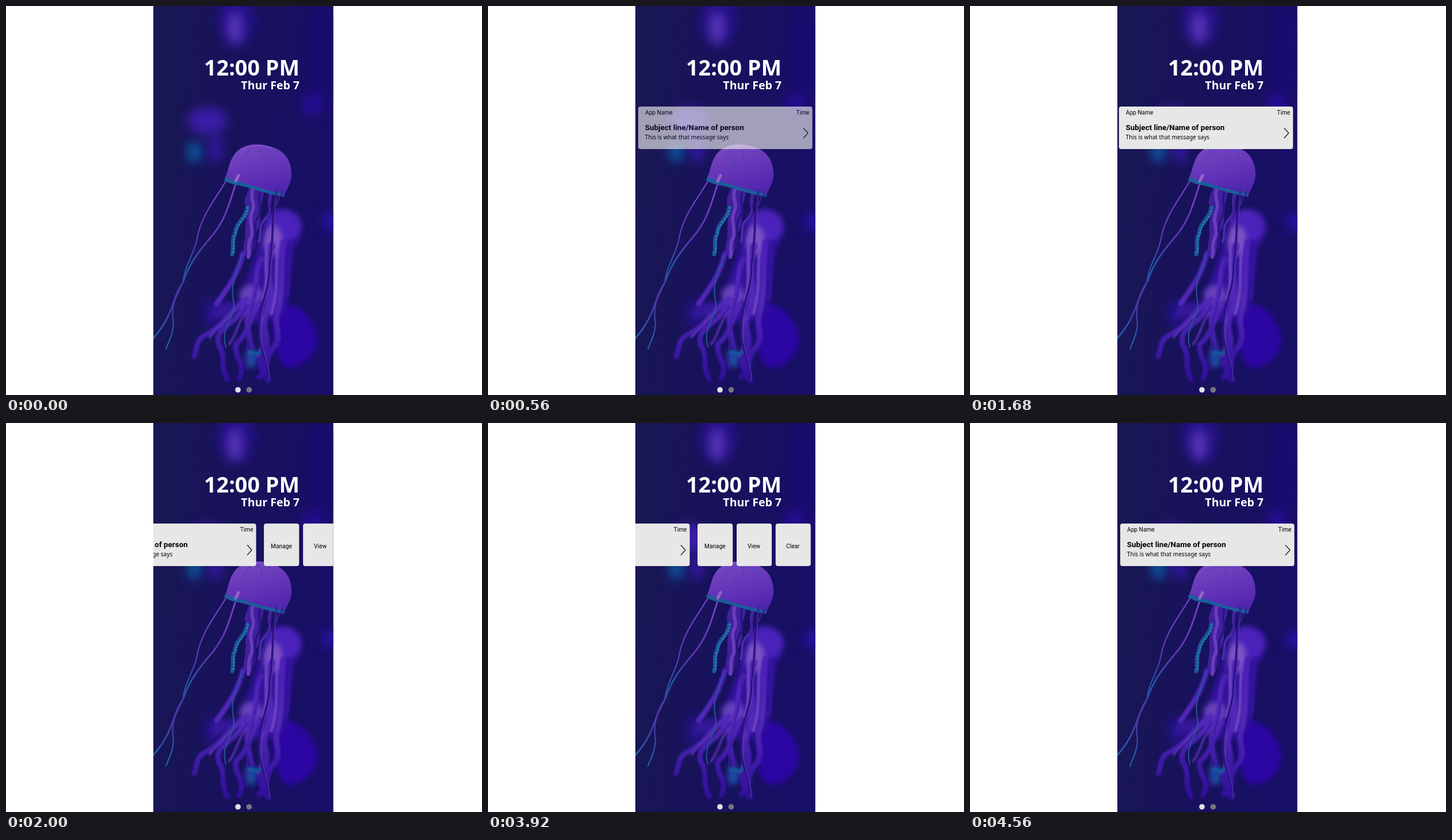
Animation, 827 px wide and 677 px high, one loop 6840 ms. Source, as an HTML page:

```html
<!DOCTYPE html>
<html lang="en">
<head>
<meta charset="utf-8">
<title>Lock screen notification</title>
<style>
  html, body { margin: 0; width: 100%; height: 100%; overflow: hidden; background: #fff; }
  svg { display: block; }
  filter { color-interpolation-filters: sRGB; }
  .line { fill: none; stroke-linecap: round; stroke-linejoin: round; }
  .clock { font-family: "Noto Sans", sans-serif; font-weight: 700; fill: #fff; text-anchor: end; }
  .label { font: 10.2px Roboto, sans-serif; }
  .subject { font: 700 13.4px Roboto, sans-serif; }
  .message { font: 10.1px "Noto Sans", sans-serif; }
  .end { text-anchor: end; }
  .mid { text-anchor: middle; }
</style>
</head>
<body>
<svg width="827" height="677" viewBox="0 0 827 677">
  <defs>
    <clipPath id="screen"><rect x="256" width="312.7" height="677"/></clipPath>
    <filter id="haze" x="-50%" y="-50%" width="200%" height="200%"><feGaussianBlur stdDeviation="9"/></filter>
    <filter id="soft" x="-30%" y="-30%" width="160%" height="160%"><feGaussianBlur stdDeviation="4"/></filter>
    <filter id="near" x="-30%" y="-30%" width="160%" height="160%"><feGaussianBlur stdDeviation="1.6"/></filter>
    <linearGradient id="sea" x1="0" y1="0" x2="1" y2="0.15">
      <stop offset="0" stop-color="#191853"/>
      <stop offset=".5" stop-color="#18125c"/>
      <stop offset="1" stop-color="#180f66"/>
    </linearGradient>
    <linearGradient id="bell" x1="0" y1="0" x2=".35" y2="1">
      <stop offset="0" stop-color="#7a4cc2"/>
      <stop offset=".5" stop-color="#6838ba"/>
      <stop offset="1" stop-color="#5226ae"/>
    </linearGradient>
    <linearGradient id="strand" gradientUnits="userSpaceOnUse" x1="0" y1="305" x2="0" y2="597">
      <stop offset="0" stop-color="#7844c8"/>
      <stop offset=".35" stop-color="#6034b8"/>
      <stop offset=".5" stop-color="#1f58a6"/>
      <stop offset=".7" stop-color="#5030ac"/>
      <stop offset="1" stop-color="#1a68a8"/>
    </linearGradient>
    <linearGradient id="arms" gradientUnits="userSpaceOnUse" x1="0" y1="380" x2="0" y2="650">
      <stop offset="0" stop-color="#4a1cb8"/>
      <stop offset=".5" stop-color="#5228b8"/>
      <stop offset="1" stop-color="#30109a"/>
    </linearGradient>
  </defs>

  <g clip-path="url(#screen)">
    <rect x="255" width="314" height="677" fill="url(#sea)"/>

    <!-- out-of-focus jellyfish -->
    <g filter="url(#haze)">
      <ellipse cx="400" cy="25" rx="32" ry="46" fill="#26108a"/>
      <ellipse cx="398" cy="38" rx="13" ry="28" fill="#5636b4"/>
      <ellipse cx="545" cy="90" rx="22" ry="100" fill="#190c70"/>
      <ellipse cx="532" cy="172" rx="18" ry="20" fill="#260c90"/>
      <ellipse cx="562" cy="376" rx="10" ry="16" fill="#2c12b4"/>
      <ellipse cx="350" cy="200" rx="34" ry="24" fill="#3a1ca6"/>
      <ellipse cx="364" cy="250" rx="12" ry="24" fill="#32189e"/>
      <ellipse cx="327" cy="254" rx="12" ry="18" fill="#0d56a0"/>
      <ellipse cx="360" cy="535" rx="16" ry="26" fill="#24128a"/>
    </g>
    <g filter="url(#soft)">
      <path d="M470 519C505 512 533 538 541 577C541 604 519 629 490 630C466 624 456 550 470 519Z" fill="#2c06a2"/>
      <path d="M450 374C462 349 492 345 510 367C520 383 512 406 500 421L486 525C470 560 414 560 402 520L431 440Z" fill="#32129c"/>
      <path d="M452 370C468 348 498 349 511 374C517 392 503 408 492 410L452 396Z" fill="#4a22ba"/>
      <ellipse cx="464" cy="408" rx="17" ry="27" fill="#7a50c2"/>
      <ellipse cx="426" cy="503" rx="20" ry="18" fill="#6640ba"/>
      <ellipse cx="426" cy="612" rx="11" ry="18" fill="#1c489c"/>
      <path d="M362 518L402 514L390 542L354 542Z" fill="#34189a"/>
    </g>

    <!-- trailing arms -->
    <g class="line" stroke="url(#arms)" filter="url(#near)">
      <path d="M412 430C400 474 385 490 366 518" stroke-width="9"/>
      <path d="M419 510C386 532 383 552 350 571C329 579 333 594 327 610" stroke-width="9"/>
      <path d="M414 520C399 558 359 559 370 591C383 609 371 625 384 650" stroke-width="9"/>
      <path d="M437 520C420 553 421 570 399 589C397 617 418 620 405 648" stroke-width="9"/>
      <path d="M462 417C446 468 468 490 454 530C437 562 462 574 447 603C435 626 450 635 455 650" stroke-width="12"/>
      <path d="M482 411C476 457 482 489 473 529C462 557 482 572 466 593C445 615 462 630 440 646" stroke-width="10"/>
      <path d="M495 410C488 455 494 482 487 512" stroke-width="6" stroke="#36139f"/>
      <path d="M443 440C429 473 440 492 425 522C413 547 422 568 427 594" stroke-width="9"/>
      <path d="M453 420C449 458 457 478 446 511M472 425C467 465 474 496 461 536" stroke-width="5" stroke="#7046c2"/>
      <path d="M399 530C381 549 371 554 354 577M419 530C400 553 402 572 387 589M448 539C435 565 451 581 437 610" stroke-width="3" stroke="#6036b8"/>
      <path d="M421 604C434 599 427 610 441 603" stroke-width="6" stroke="#17559e"/>
    </g>

    <!-- arms under the bell -->
    <path d="M424 314C414 335 411 344 421 353C412 382 419 391 414 412C410 428 416 434 421 440C435 427 424 406 436 391C448 370 435 359 445 340L449 320Z" fill="#40209c"/>
    <g class="line">
      <path d="M429 318C423 337 434 342 428 357C419 377 434 388 424 407C419 421 424 430 421 437" stroke="#683cba" stroke-width="6"/>
      <path d="M442 322C435 340 447 351 438 367C426 387 437 398 431 421" stroke="#2c1486" stroke-width="4"/>
      <path d="M459 329C452 346 467 355 448 373C438 384 444 397 439 411" stroke="#4c2aae" stroke-width="4"/>
      <path d="M419 351C417 370 399 377 398 396C391 407 397 420 393 432" stroke="#165a96" stroke-width="7"/>
      <path d="M420 351C418 370 401 378 399 396C393 407 398 420 394 430" stroke="#1f8cac" stroke-width="3" stroke-dasharray="0.5 5"/>
      <path d="M417 353C414 370 398 379 396 396C390 407 395 420 392 430" stroke="#34309a" stroke-width="2" stroke-dasharray="1 6"/>
      <path d="M410 432C402 464 389 479 395 512C401 540 371 559 382 594" stroke="#205799" stroke-width="2"/>
      <path d="M457 328C463 363 443 399 442 440C440 492 423 531 419 575L418 632" stroke="#38209c" stroke-width="1.8"/>
      <path d="M468 330C461 379 465 407 458 452C459 495 439 520 440 558C436 599 459 615 456 653" stroke="#28147e" stroke-width="3.5"/>
      <path d="M470 331C464 378 467 407 460 452C461 497 442 522 443 558C440 598 460 620 457 653" stroke="#5c36b2" stroke-width="1.2"/>
      <path d="M382 305C361 340 338 366 331 409C325 435 310 453 307 482C294 508 286 522 291 553C290 572 283 582 278 597" stroke="url(#strand)" stroke-width="2.2"/>
      <path d="M402 302C390 333 386 363 362 395C336 426 319 446 308 480C288 507 293 536 256 578" stroke="url(#strand)" stroke-width="2.8"/>
      <path d="M476 329L470 346M462 327L459 350" stroke="#3a208c" stroke-width="2.4"/>
    </g>

    <!-- bell -->
    <path d="M379 303C388 286 387 263 405 250C421 238 443 239 461 245C486 252 497 271 496 297C493 315 486 320 483 332C451 327 423 315 399 311Q388 309 379 303Z" fill="url(#bell)"/>
    <path d="M381 298C411 307 443 319 484 327L483 332C451 327 423 315 399 311Q388 309 379 303Z" fill="#1a5e9c"/>
    <g class="line">
      <path d="M427 249Q416 255 411 267M436 247Q449 256 443 266L449 276M455 251Q468 256 466 269L471 277M426 267Q433 276 426 285M453 277Q447 282 450 291" stroke="#4a40b5" stroke-width="1.2"/>
      <path d="M404 295L399 305" stroke="#9664ca" stroke-width="5"/>
      <path d="M408 251Q431 237 461 247" stroke="#8a5cc4" stroke-width="1"/>
      <path d="M470 320L469 328M480 322L479 330" stroke="#2c3092" stroke-width="4"/>
    </g>

    <text class="clock" x="510" y="121" font-size="37.7">12:00 PM</text>
    <text class="clock" x="510" y="145" font-size="19.5">Thur Feb 7</text>
    <circle cx="403" cy="668" r="4.8" fill="#e3e0e6"/>
    <circle cx="422.4" cy="668" r="4.8" fill="#777681"/>

    <g id="strip" opacity="0">
      <g fill="#e7e7e7">
        <rect x="261" y="175" width="302.5" height="74" rx="4"/>
        <rect x="577" y="175" width="61.2" height="74" rx="4"/>
        <rect x="645" y="175" width="61" height="74" rx="4"/>
        <rect x="712.7" y="175" width="61" height="74" rx="4"/>
      </g>
      <text class="label" x="273" y="189">App Name</text>
      <text class="label end" x="558.5" y="189">Time</text>
      <text class="subject" x="272.8" y="216">Subject line/Name of person</text>
      <text class="message" x="272.8" y="232">This is what that message says</text>
      <path d="M548 212.5L556 221L548 230" fill="none" stroke="#111" stroke-width="1.2"/>
      <text class="label mid" x="607.4" y="218">Manage</text>
      <text class="label mid" x="675" y="218">View</text>
      <text class="label mid" x="742.8" y="218">Clear</text>
    </g>
  </g>
</svg>
<script>
  const LOOP = 6840, STEP = 40, TRAVEL = 215;
  const strip = document.getElementById('strip');
  const start = performance.now();

  const progress = (t, from, to) => Math.min(1, Math.max(0, (t - from) / (to - from)));
  const ease = p => (1 - Math.cos(Math.PI * p)) / 2;

  function draw() {
    const elapsed = (performance.now() - start) % LOOP;
    const t = Math.floor(elapsed / STEP) * STEP;
    const open = ease(progress(t, 1638, 2280)) - ease(progress(t, 3878, 4560));
    strip.setAttribute('opacity', progress(t, 0, 840));
    strip.setAttribute('transform', `translate(${-TRAVEL * open} 0)`);
    requestAnimationFrame(draw);
  }
  draw();
</script>
</body>
</html>
```
